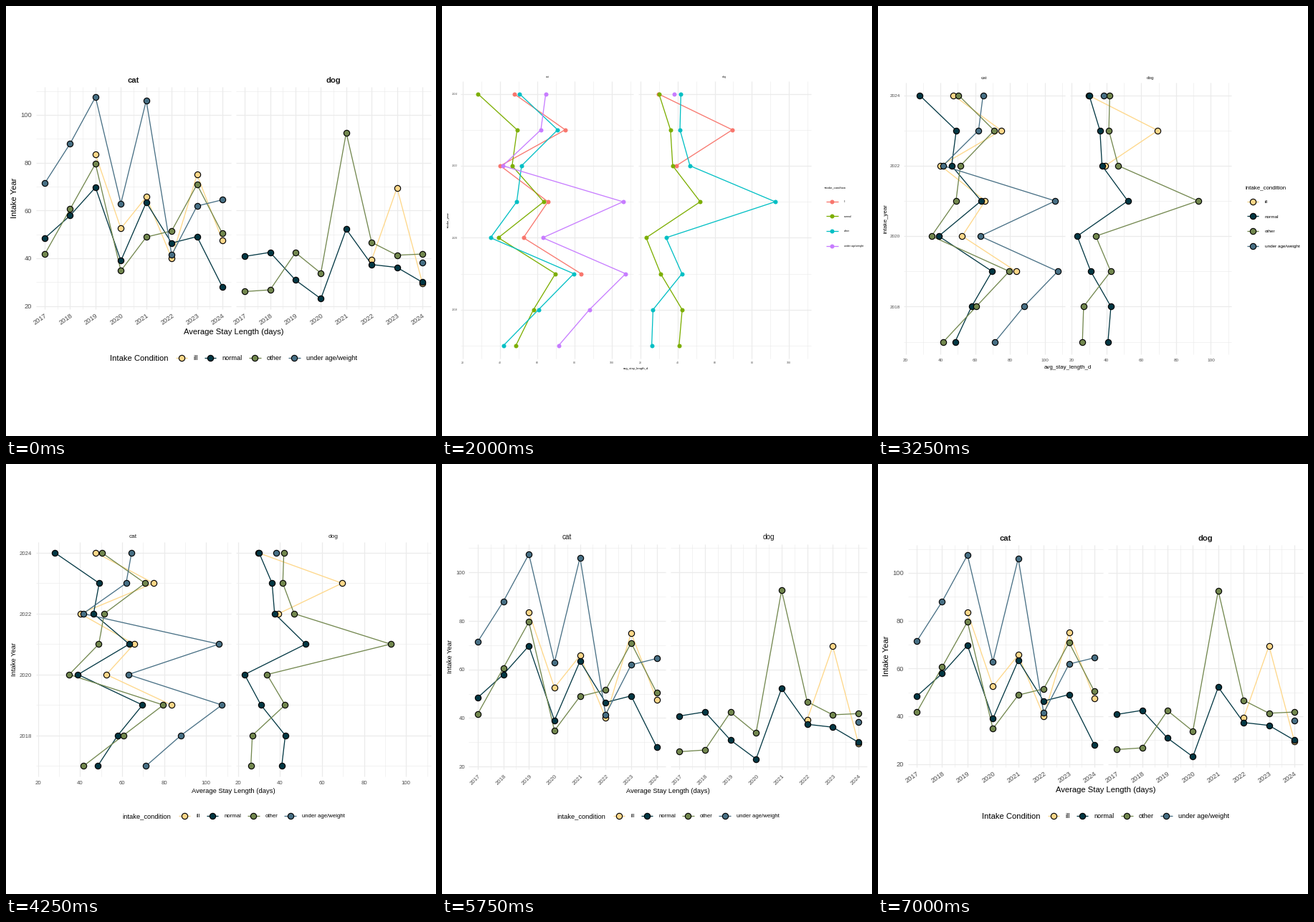
Write a matplotlib script that moves like this. It is 600 by 600 pixels and loops after 8000 ms.

```python
import math

import matplotlib.pyplot as plt
from matplotlib.animation import FuncAnimation

SIZE, DPI, STEP_MS, LOOP_MS = 600, 100, 250, 8000
PX = 72 / DPI  # points per pixel
YEARS = range(2017, 2025)
CONDITIONS = ["ill", "normal", "other", "under age/weight"]
HUES = ["#F8766D", "#7CAE00", "#00BFC4", "#C77CFF"]
PARK = ["#FED789", "#023743", "#72874E", "#476F84"]
GRID = "#EBEBEB"

# Average stay per condition, ending in 2024
STAYS = {
    "cat": [
        [83.5, 52.5, 65.7, 40.1, 75.0, 47.5],
        [48.4, 57.9, 69.7, 39.0, 63.4, 46.4, 49.1, 28.0],
        [41.7, 60.6, 79.6, 34.8, 48.9, 51.5, 70.9, 50.4],
        [71.4, 88.0, 107.5, 62.9, 106.1, 41.4, 61.9, 64.5],
    ],
    "dog": [
        [39.3, 69.5, 29.6],
        [40.8, 42.5, 30.9, 23.1, 52.2, 37.4, 36.2, 30.0],
        [26.1, 26.8, 42.4, 33.8, 92.6, 46.7, 41.3, 41.8],
        [38.2],
    ],
}


def records(stays):
    return list(zip(range(2025 - len(stays), 2025), stays))


def side_legend(key_x, title_y=253):
    return dict(title=(key_x - 10.2, title_y),
                keys=[(key_x, 272.6 + 20.65 * i) for i in range(4)])


def bottom_legend(title_x, key_xs):
    return dict(title=(title_x, 490.5), keys=[(x, 490.5) for x in key_xs])


# Each step overrides part of the look that came before it
STEPS = [
    (1000, dict(panels=(24.5, 266.5, 273.5, 514.5), top=105, bottom=491.5,
                base=4.25, strip=3.6, strip_y=98.5, bold=False,
                year_on_x=True, year_step=2, free=False, angle=0, shift=0,
                tick_right=19.8, tick_y=498.2, title_y=505, title_x=8.2,
                x_title="intake_year", y_title="avg_stay_length_d",
                legend_title="intake_condition", legend=side_legend(544.3),
                lines="year", points=None, line_colors=HUES, fills=HUES)),
    (1250, dict(year_on_x=False, panels=(26.4, 267.2, 273.9, 514.6),
                tick_right=21.4, lines=None, points="plain",
                x_title="avg_stay_length_d", y_title="intake_year")),
    (1500, dict(free=True)),
    (1750, dict(free=False, lines="stay")),
    (2000, dict(lines="year")),
    (2250, dict(points="small")),
    (2500, dict(panels=(31, 264, 271, 504), top=106, bottom=488.7, base=6,
                strip=5, strip_y=99, tick_right=26, tick_y=496, title_y=504,
                title_x=8.8, legend=side_legend(534))),
    (2750, dict(panels=(36, 261, 267.7, 492.9), top=107.4, bottom=485.7,
                base=7.85, strip=6.4, strip_y=99.7, tick_right=30.5,
                tick_y=493.8, title_y=503, title_x=9.3,
                legend=side_legend(523, 252.5))),
    (3000, dict(points="large", fills=PARK)),
    (3250, dict(line_colors=PARK)),
    (3500, dict(panels=(41.5, 257, 264, 480), top=109, bottom=482.5,
                base=9.45, strip=8, strip_y=100.5, tick_right=36.2,
                tick_y=491, title_y=502, title_x=10.2,
                legend=side_legend(510.5, 252))),
    (3750, dict(panels=(41.5, 313.6, 320.5, 592.6), bottom=436.1,
                tick_y=444.3, title_y=455.6,
                legend=bottom_legend(162, (249, 288, 345.3, 396.5)))),
    (4000, dict(x_title="Average Stay Length (days)",
                y_title="Intake Year")),
    (4250, dict(base=9.4, strip=8.3)),
    (4750, dict(year_on_x=True, panels=(37.4, 312.1, 318.7, 593.4),
                tick_right=32,
                legend=bottom_legend(160, (247, 286, 343.3, 394.5)))),
    (5250, dict(strip=10, strip_y=101.3, top=111.5)),
    (5500, dict(year_step=1)),
    (5750, dict(angle=45, shift=-3.8, tick_y=440, bottom=425.9)),
    (6000, dict(angle=35, shift=-5.5, tick_y=438.5, bottom=428)),
    (6250, dict(bold=True)),
    (6500, dict(panels=(41.6, 314.4, 320.7, 593.4), bottom=422.5, base=11.3,
                tick_right=36.3, tick_y=436.7, shift=-6.5, title_y=454.3,
                title_x=10.6,
                legend=bottom_legend(145, (245, 285, 347.2, 402.3)))),
    (6750, dict(strip=11.2, strip_y=102.5, top=113)),
    (7000, dict(legend_title="Intake Condition")),
]


def look_at(ms):
    if ms < STEPS[0][0]:
        ms = LOOP_MS
    look = {}
    for start, change in STEPS:
        if start <= ms:
            look.update(change)
    return look


fig = plt.figure(figsize=(SIZE / DPI, SIZE / DPI), dpi=DPI, facecolor="white")
ax = fig.add_axes([0, 0, 1, 1])


def label(x, y, text, size, color="black", ha="left", angle=0, weight="normal"):
    """Text whose capitals are vertically centred on (x, y)."""
    turn, drop = math.radians(angle), 0.36 * size
    ax.text(x + drop * math.sin(turn), y + drop * math.cos(turn), text,
            fontsize=size * PX, color=color, ha=ha, va="baseline",
            rotation=angle, rotation_mode="anchor", weight=weight,
            family="Liberation Sans", zorder=5)


def stroke(xs, ys, color, width, z):
    ax.plot(xs, ys, color=color, lw=width * PX, zorder=z,
            solid_capstyle="butt", solid_joinstyle="round")


def dots(xs, ys, color, style):
    diameter, edge = {"plain": (6, 0), "small": (5.1, 0.9),
                      "large": (8.3, 1.15)}[style]
    ax.plot(xs, ys, "o", ms=diameter * PX, mfc=color, mec="black",
            mew=edge * PX, zorder=4)


def expanded(values):
    low, high = min(values), max(values)
    pad = 0.05 * (high - low)
    return low - pad, high + pad


def scaler(limits, start, end):
    low, high = limits
    return lambda v: start + (v - low) / (high - low) * (end - start)


def breaks(first, step, limits):
    inside = [first + step * i for i in range(-2, 12)]
    return [v for v in inside if limits[0] <= v <= limits[1]]


def draw_panel(look, animal, left, right, first):
    top, bottom = look["top"], look["bottom"]
    animals = [animal] if look["free"] else STAYS
    stay_limits = expanded([v for a in animals for row in STAYS[a] for v in row])
    year_limits = expanded(YEARS)
    year_step = look["year_step"]
    year_start = 2018 if year_step == 2 else 2017
    flip = look["year_on_x"]

    across, down = (left, right), (bottom, top)
    year_pos = scaler(year_limits, *(across if flip else down))
    stay_pos = scaler(stay_limits, *(down if flip else across))
    axes = [(year_pos, year_limits, year_start, year_step, flip),
            (stay_pos, stay_limits, 20, 20, not flip)]

    for pos, limits, start, step, horizontal in axes:
        for offset, width in ((step / 2, 0.65), (0, 1.25)):
            for v in breaks(start + offset, step, limits):
                line = [pos(v)] * 2
                if horizontal:
                    stroke(line, down, GRID, width, 1)
                else:
                    stroke(across, line, GRID, width, 1)
        for v in breaks(start, step, limits):
            size = 0.82 * look["base"]
            if horizontal:
                label(pos(v) + look["shift"], look["tick_y"], str(v), size,
                      "#4D4D4D", "center", look["angle"])
            elif first:
                label(look["tick_right"], pos(v), str(v), size, "#4D4D4D",
                      "right")

    for stays, color, fill in zip(STAYS[animal], look["line_colors"],
                                  look["fills"]):
        rows = records(stays)
        if look["lines"] == "stay":
            rows.sort(key=lambda row: row[1])
        years = [year_pos(year) for year, _ in rows]
        values = [stay_pos(stay) for _, stay in rows]
        xs, ys = (years, values) if flip else (values, years)
        if look["lines"]:
            stroke(xs, ys, color, 1.3, 3)
        if look["points"]:
            dots(xs, ys, fill, look["points"])

    label((left + right) / 2, look["strip_y"], animal, look["strip"],
          "#1A1A1A", "center", weight="bold" if look["bold"] else "normal")


def draw_legend(look):
    legend = look["legend"]
    label(*legend["title"], look["legend_title"], look["base"])
    gap = 16.8 if look["base"] < 9 else 16.3
    for (x, y), name, color, fill in zip(legend["keys"], CONDITIONS,
                                         look["line_colors"], look["fills"]):
        if look["lines"]:
            stroke([x - 8.3, x + 8.3], [y, y], color, 1.3, 3)
        if look["points"]:
            dots([x], [y], fill, look["points"])
        label(x + gap, y, name, 0.82 * look["base"])


def draw(frame):
    look = look_at(frame * STEP_MS)
    ax.clear()
    ax.set(xlim=(0, SIZE), ylim=(SIZE, 0))
    ax.axis("off")

    l0, r0, l1, r1 = look["panels"]
    draw_panel(look, "cat", l0, r0, True)
    draw_panel(look, "dog", l1, r1, False)
    label((l0 + r1) / 2, look["title_y"], look["x_title"], look["base"],
          ha="center")
    label(look["title_x"], (look["top"] + look["bottom"]) / 2,
          look["y_title"], look["base"], ha="center", angle=90)
    draw_legend(look)
    return []


anim = FuncAnimation(fig, draw, frames=LOOP_MS // STEP_MS, interval=STEP_MS,
                     repeat=True, repeat_delay=0, blit=False)
plt.show()
```
